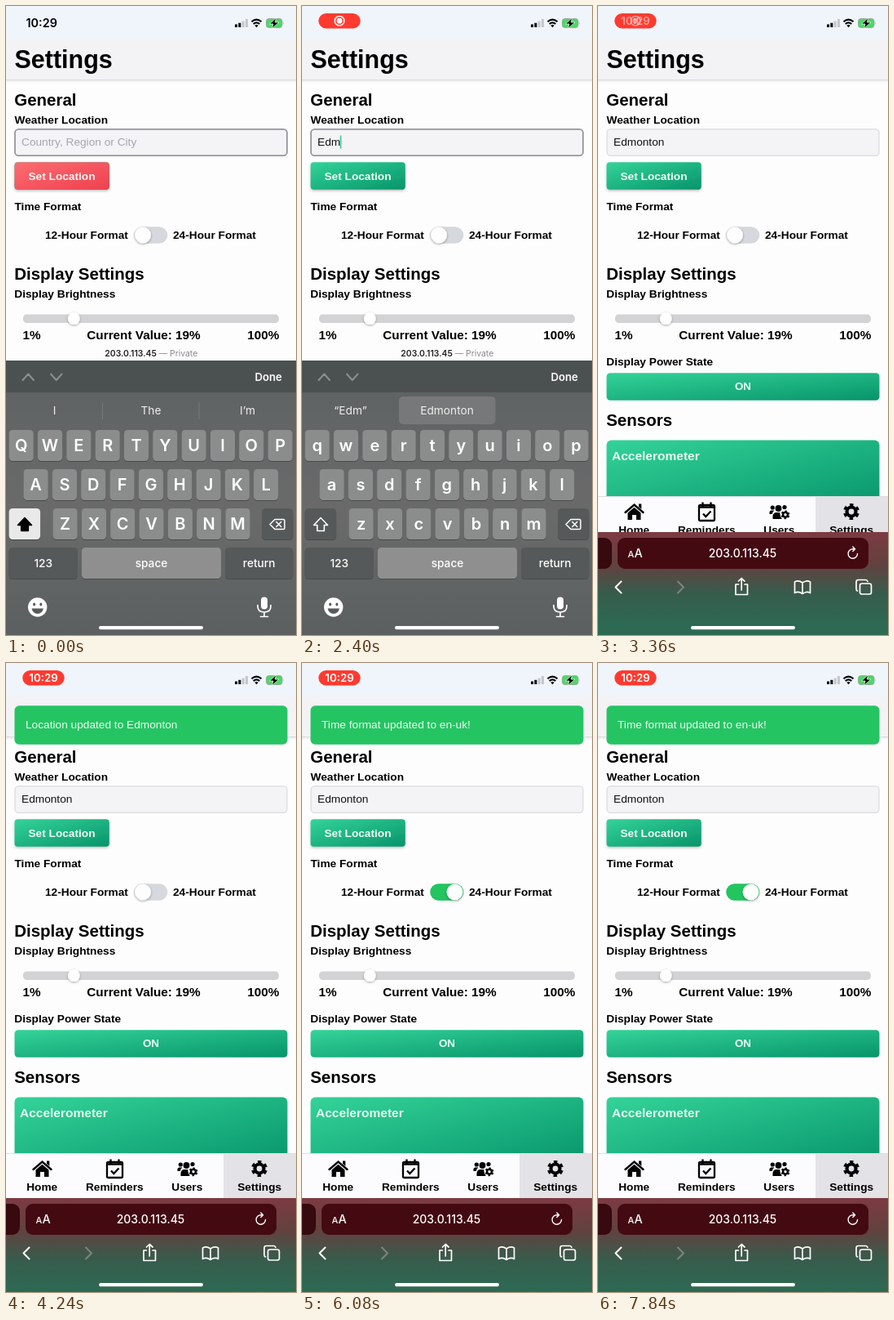
An HTML page that plays this animation: 356x770 px, repeating every 8 s.

```html
<!DOCTYPE html>
<html lang="en">
<head>
<meta charset="utf-8">
<title>Settings</title>
<style>
  html, body { margin: 0; width: 100%; height: 100%; overflow: hidden; background: #fff; }
  svg { display: block; width: 356px; height: 770px; }
  text { font: 13.7px "Liberation Sans", Arial, sans-serif; white-space: pre; }
  .b { font-weight: 700; }
  .h { font-weight: 700; font-size: 20.5px; }
  .v { font-weight: 700; font-size: 15.3px; }
  .ui { font-family: Inter, Roboto, sans-serif; font-size: 13.7px; }
  .key { font-size: 20px; font-weight: 600; }
  .cmd { font-weight: 500; }
  .mid { text-anchor: middle; }
  .line { fill: none; stroke: #fff; stroke-width: 1.7; stroke-linecap: round; stroke-linejoin: round; }
</style>
</head>
<body>
<svg viewBox="0 0 356 770">
  <defs>
    <linearGradient id="green" x2="1" y2="1"><stop stop-color="#34d399"/><stop offset="1" stop-color="#07946a"/></linearGradient>
    <linearGradient id="red" x2="1" y2="1"><stop stop-color="#fd6c72"/><stop offset="1" stop-color="#ee414e"/></linearGradient>
    <linearGradient id="keys" x2="0" y2="1"><stop stop-color="#5d6162"/><stop offset=".55" stop-color="#6a6a6a"/><stop offset="1" stop-color="#5a5f5f"/></linearGradient>
    <linearGradient id="bar" x2="0" y2="1"><stop stop-color="#7d3a42"/><stop offset=".35" stop-color="#61423f"/><stop offset=".65" stop-color="#375c4c"/><stop offset="1" stop-color="#2c6a54"/></linearGradient>
    <filter id="shade" x="-30%" y="-30%" width="160%" height="180%"><feDropShadow dx="0" dy="1.5" stdDeviation="1.6" flood-opacity=".25"/></filter>
    <filter id="lift" x="-60%" y="-60%" width="220%" height="220%"><feDropShadow dx="0" dy="1" stdDeviation="1.8" flood-opacity=".35"/></filter>
  </defs>

  <!-- page -->
  <rect width="356" height="770" fill="#fdfdfe"/>
  <rect width="356" height="41" fill="#f0f5fc"/>
  <rect y="41" width="356" height="49" fill="#f3f2f5"/>
  <rect y="90" width="356" height="1.5" fill="#dcdbe0"/>
  <rect y="91.5" width="356" height="2" fill="#f3f3f5"/>
  <text class="b" x="10.5" y="76" style="font-size:30.5px">Settings</text>
  <text class="h" x="10.2" y="122">General</text>
  <text class="b" x="10.5" y="144">Weather Location</text>
  <rect id="field" x="11" y="150.8" width="334" height="32.4" rx="4.5" fill="#f4f3f6"/>
  <text id="hint" x="19" y="171" fill="#a6a6ac">Country, Region or City</text>
  <text id="typed" x="19" y="171" fill="#111"></text>
  <rect id="caret" y="158.5" width="1.6" height="16" fill="#34c793"/>
  <g filter="url(#shade)">
    <rect x="10.5" y="191.2" width="116.3" height="33.6" rx="4" fill="url(#green)"/>
    <rect id="redBtn" x="10.5" y="191.2" width="116.3" height="33.6" rx="4" fill="url(#red)"/>
  </g>
  <text class="b mid" x="68.5" y="212.5" fill="#f2fbf7">Set Location</text>
  <text class="b" x="10.5" y="250">Time Format</text>
  <text class="b" x="48" y="285">12-Hour Format</text>
  <text class="b" x="205" y="285">24-Hour Format</text>
  <rect x="157.3" y="270.2" width="41" height="20.6" rx="10.3" fill="#d5d8dc"/>
  <rect id="on" x="157.3" y="270.2" width="41" height="20.6" rx="10.3" fill="#22c55e"/>
  <circle id="knob" cy="280.5" r="10" fill="#fdfdfd" filter="url(#lift)"/>
  <text class="h" x="10.2" y="335">Display Settings</text>
  <text class="b" x="10.3" y="357">Display Brightness</text>
  <rect x="21" y="377.5" width="314" height="10.5" rx="4.5" fill="#d3d3d5"/>
  <circle cx="83.3" cy="382.7" r="7.4" fill="#fff" filter="url(#lift)"/>
  <text class="v" x="20.5" y="408">1%</text>
  <text class="v mid" x="169" y="408">Current Value: 19%</text>
  <text class="v" x="335.3" y="408" text-anchor="end">100%</text>
  <text class="b" x="10.3" y="439.5">Display Power State</text>
  <rect x="10.5" y="449.3" width="335" height="33.4" rx="4.5" fill="url(#green)"/>
  <text class="b mid" x="178" y="470" fill="#e9fbf3" style="font-size:13.4px">ON</text>
  <text class="h" x="10.2" y="514">Sensors</text>
  <rect x="10.5" y="531.4" width="335" height="84" rx="6" fill="url(#green)"/>
  <text class="v" x="17" y="556" fill="#e6fbf2" style="font-size:15.5px">Accelerometer</text>

  <!-- tabs -->
  <rect y="600" width="356" height="60" fill="#fcfbfd"/>
  <rect x="267" y="600" width="89" height="60" fill="#e3e2e6"/>
  <rect y="600" width="356" height="1" fill="#dedde1"/>
  <path d="M33.5 620 44.5 610.5 55.5 620" fill="none" stroke="#000" stroke-width="2.4" stroke-linecap="round"/>
  <path d="M36.5 620.5 44.5 613.8 52.5 620.5V629H47V623H42V629H36.5ZM50 609.5H53.3V616L50 613Z"/>
  <g fill="none" stroke="#000" stroke-width="2.3">
    <rect x="124" y="611" width="19" height="19" rx="1.6"/>
    <path d="M124 613.5H143M128.500 607.5V613M138.5 607.5V613M129 621.5 132.3 625 138.5 618.5"/>
  </g>
  <circle cx="214.3" cy="614" r="2.6"/><circle cx="221.5" cy="615" r="3.9"/><circle cx="229" cy="613.5" r="2.6"/>
  <path d="M210.5 622V620Q210.5 617.5 213 617.5H216.5Q214 619 213.800 622ZM214.5 628V624.500Q215 620 219 620H223Q223.500 624 226 628Z"/>
  <circle cx="230" cy="622.800" r="6.300" fill="#fcfbfd"/>
  <g fill="none" stroke="#000">
    <circle cx="230" cy="622.8" r="2.9" stroke-width="2.4"/>
    <circle cx="230" cy="622.8" r="4.6" stroke-width="1.6" stroke-dasharray="2.41" stroke-dashoffset="3.6"/>
    <circle cx="311" cy="619" r="5.500" stroke-width="4.2"/>
    <circle cx="311" cy="619" r="8.5" stroke-width="3" stroke-dasharray="4.45" stroke-dashoffset="6.65"/>
  </g>
  <g class="mid">
    <text class="b" x="44.2" y="646">Home</text><text class="b" x="133.3" y="646">Reminders</text>
    <text class="b" x="222.3" y="646">Users</text><text class="b" x="311.2" y="646">Settings</text>
  </g>

  <!-- browser bar -->
  <g id="chrome">
    <g id="barBody">
      <rect y="655" width="356" height="116" fill="url(#bar)"/>
      <rect y="770" width="356" height="240" fill="#2c6a54"/>
      <rect x="-20" y="662" width="37" height="38" rx="9" fill="#360a0e"/>
      <rect x="24" y="662" width="308" height="38" rx="9" fill="#430a11"/>
      <text class="ui cmd" x="36.5" y="686" fill="#fff" style="font-size:11px">A</text>
      <text class="ui cmd" x="44.5" y="686" fill="#fff" style="font-size:14.5px">A</text>
      <text class="ui cmd mid" x="177.5" y="686" fill="#fff" style="font-size:14px">203.0.113.45</text>
      <g class="line">
        <path d="M318.5 681.5A5.7 5.7 0 1 1 313 675.8H315M312.8 673 315.6 675.8 312.8 678.6" stroke-width="1.4"/>
        <path d="M28.5 715.5 21.5 722.5 28.5 729.5" stroke-width="2"/>
        <path d="M98 715.5 105 722.5 98 729.5" stroke="#7d8580" stroke-width="2"/>
        <path d="M172.5 719H169V731.5H183.5V719H180M176.2 726V711.5M172.5 715 176.2 711.5 180 715"/>
        <path d="M251 717Q246 713.5 241.5 716V729.5Q246 727 251 730.5Q256 727 260.5 729.5V716Q256 713.5 251 717V730"/>
        <rect x="321.5" y="718" width="14" height="13" rx="2.5"/>
        <path d="M318.5 727Q317 726.5 317 724.5V716Q317 713.5 319.5 713.5H328.5Q330.5 713.5 331 715.5"/>
      </g>
    </g>
    <g id="compact">
      <rect y="654" width="356" height="21" fill="#fdfdfe"/>
      <text class="ui mid" x="178.3" y="669" fill="#8a8a8e" style="font-size:10.4px"><tspan fill="#222" font-weight="600">203.0.113.45</tspan> — Private</text>
    </g>
  </g>

  <!-- keyboard -->
  <g id="board">
    <rect y="434" width="356" height="340" fill="url(#keys)"/>
    <rect y="434" width="356" height="39" fill="#4b5050"/>
    <path class="line" d="M20.5 458 27.3 450.5 34 458M55 450.5 61.8 458 68.5 450.5" style="stroke:#8a8e8e;stroke-width:2"/>
    <text class="ui" x="305.5" y="459" fill="#fff" style="font-size:13.2px;font-weight:600">Done</text>
    <path id="split" d="M118.5 485V506M237 485V506" stroke="#767a7a"/>
    <rect id="pick" x="119" y="478" width="118.5" height="34" rx="5" fill="#777879"/>
    <g class="mid" fill="#eee">
      <text class="ui sug" x="59.5" y="500"></text>
      <text class="ui sug" x="178" y="500"></text>
      <text class="ui sug" x="296.5" y="500"></text>
    </g>
    <g id="caps"></g>
    <path id="shift" d="M23 626.5 31.5 635.5H27.3V642.5H18.7V635.5H14.5Z" stroke-width="1.6" stroke-linejoin="round"/>
    <path class="line" d="M324 634.5 330 628.5H340.5Q342 628.5 342 630V639Q342 640.5 340.5 640.5H330ZM331.8 631.5 337.8 637.5M337.8 631.5 331.8 637.5" style="stroke-width:1.5"/>
    <circle cx="38.7" cy="736" r="11.7" fill="#fff"/>
    <g fill="#565a5a"><ellipse cx="34.6" cy="732.5" rx="1.5" ry="2.1"/><ellipse cx="42.8" cy="732.5" rx="1.5" ry="2.1"/><path d="M31.5 737.5H46Q44.5 744 38.7 744Q33 744 31.5 737.5Z"/></g>
    <rect x="313" y="723.5" width="8" height="15" rx="4" fill="#fff"/>
    <path class="line" d="M309 733.5V735Q309 742 317 742Q325 742 325 735V733.5M317 742V747.5M312.5 747.5H321.5"/>
  </g>
  <rect x="114" y="759" width="128" height="4.2" rx="2.1" fill="#fff"/>

  <!-- toast -->
  <g id="toast">
    <rect x="10.5" y="52.3" width="335" height="47.4" rx="5.5" fill="#25c463"/>
    <text id="note1" x="24" y="80" fill="#eafaef">Location updated to Edmonton</text>
    <text id="note2" x="24" y="80" fill="#eafaef">Time format updated to en-uk!</text>
  </g>

  <!-- status -->
  <text id="clock" class="ui" x="24.5" y="26" style="font-size:14.4px;font-weight:600">10:29</text>
  <g id="pill">
    <rect id="pillBg" x="20.3" y="9" width="51.4" height="18.4" rx="9.2"/>
    <g id="rec"><circle cx="46" cy="18.2" r="5.8" fill="none" stroke="#fff" stroke-width="1.5"/><circle cx="46" cy="18.2" r="3.4" fill="#fff"/></g>
    <text id="pillTime" class="ui mid" x="46" y="23" fill="#fff" style="font-size:13.3px;font-weight:600">10:29</text>
  </g>
  <path d="M281 22.5H284V26H281ZM285.3 20.7H288.3V26H285.3Z"/>
  <path d="M289.6 18.5H292.6V26H289.6ZM293.9 16H296.9V26H293.9Z" fill="#c3c6cb"/>
  <path d="M301.5 19.2Q307.5 14 313.5 19.2M303.7 22Q307.5 18.7 311.3 22" fill="none" stroke="#000" stroke-width="2.1"/>
  <path d="M305.3 23.8Q307.5 22 309.7 23.8L307.5 26.3Z"/>
  <rect x="319.5" y="15.5" width="19.5" height="11" rx="3.2" fill="#4bd964" stroke="#9fa6a4"/>
  <path d="M340.5 19.2Q342 21 340.5 22.8Z" fill="#9fa6a4"/>
  <path d="M331.5 14.5 323.5 22H328L326.5 27.5 335 20H330.300Z" stroke="#e6f9e9" stroke-width=".8"/>
</svg>
<script>
const LOOP = 8000, FOCUS_END = 2950;
const $ = id => document.getElementById(id);
const NS = "http://www.w3.org/2000/svg";
const set = (node, attrs) => { for (const k in attrs) node.setAttribute(k, attrs[k]); return node; };
const add = (parent, tag, attrs) => parent.appendChild(set(document.createElementNS(NS, tag), attrs));
const ramp = (t, a, b) => Math.min(1, Math.max(0, (t - a) / (b - a)));
const easeOut = u => 1 - (1 - u) ** 3;
const smooth = u => u * u * (3 - 2 * u);
const fade = (id, v) => $(id).setAttribute("opacity", v);
const move = (id, y) => $(id).setAttribute("transform", `translate(0 ${y})`);
const pick = (steps, t) => steps.filter(s => s[0] <= t).pop();

const dim = (s, o) => `<tspan fill-opacity="${o}">${s}</tspan>`;
const typing = [[0, ""], [940, "E"], [1600, "Ed"], [2160, "Edm"], [2720, "Edmonton"]];
const hints = [
  [0, "I", "The", "I’m"],
  [960, "“" + dim("E", .5), "E" + dim("h", .7) + "en", "Ev" + dim("e", .6)],
  [1120, "“E”", "Even", "Every"],
  [1640, "“Ed”", "Edit", "Edge"],
  [2200, "“Edm”", "Edmonton", ""],
  [2720, "", "", ""]
];

// Keycaps
const caps = $("caps");
function cap(x, y, w, fill) {
  add(caps, "rect", { x, y: y + 1, width: w, height: 38, rx: 4.5, fill: "#484b4b" });
  return add(caps, "rect", { x, y, width: w, height: 38, rx: 4.5, fill });
}
function label(x, y, str, cls) {
  const node = add(caps, "text", { x, y, class: "ui mid " + cls, fill: "#fff" });
  node.textContent = str;
  return node;
}
const letters = [];
[["QWERTYUIOP", 3.6, 519], ["ASDFGHJKL", 21.5, 567], ["ZXCVBNM", 57.5, 615]].forEach(([row, x0, y]) => {
  [...row].forEach((ch, i) => {
    const x = x0 + i * 35.32;
    cap(x, y, 30.2, "#8b8d8d");
    letters.push([label(x + 15.1, y + 26, ch, "key"), ch]);
  });
});
const shiftCap = cap(3.6, 615, 38.5, "#565959");
cap(314, 615, 38.3, "#565959");
cap(3.6, 663, 84.4, "#565959");
cap(93, 663, 171, "#8f8f90");
cap(269, 663, 83.3, "#565959");
[[45.8, "123"], [178.5, "space"], [310.7, "return"]].forEach(([x, s]) => label(x, 686.5, s, "cmd"));

const sug = document.querySelectorAll(".sug");
let shown = null;

function drawKeyboard(t) {
  const upper = t < 960;
  const hint = pick(hints, t);
  if (hint !== shown) {
    shown = hint;
    sug.forEach((node, i) => node.innerHTML = hint[i + 1]);
  }
  const chosen = hint[2] === "Edmonton";
  fade("pick", +chosen);
  fade("split", chosen ? 0 : 1);
  letters.forEach(([node, ch]) => {
    const s = upper ? ch : ch.toLowerCase();
    if (node.textContent !== s) node.textContent = s;
  });
  set(shiftCap, { fill: upper ? "#e9e9e9" : "#565959" });
  set($("shift"), upper ? { fill: "#000", stroke: "#000" } : { fill: "none", stroke: "#fff" });
}

function drawField(t) {
  const str = pick(typing, t)[1], focus = t < FOCUS_END;
  $("typed").textContent = str;
  fade("hint", str ? 0 : 1);
  set($("field"), { stroke: focus ? "#98979c" : "#e1e0e6", "stroke-width": focus ? 1.8 : 1.5 });
  set($("caret"), { x: 18.6 + (str ? $("typed").getComputedTextLength() : 0) });
  fade("caret", focus && t > 300 ? 1 : 0);
  fade("redBtn", 1 - ramp(t, 930, 1020));
}

function drawStatus(t) {
  const red = ramp(t, 400, 650), time = ramp(t, 3180, 3540);
  const pulse = t > 3600 ? 1 : .5 - .5 * Math.cos((t - 1040) / 907 * 2 * Math.PI);
  const mix = (a, b) => Math.round(a + (b - a) * pulse);
  fade("clock", 1 - red);
  fade("pill", red);
  fade("rec", 1 - time);
  fade("pillTime", time);
  set($("pillBg"), { fill: `rgb(${mix(217, 255)},${mix(47, 59)},${mix(43, 48)})` });
}

function draw(t) {
  drawStatus(t);
  drawField(t);
  drawKeyboard(t);

  const drop = easeOut(ramp(t, FOCUS_END, 3590));
  move("board", 410 * drop);
  move("chrome", -240 * (1 - drop));
  fade("barBody", ramp(drop, .1, .6));
  fade("compact", 1 - ramp(drop, 0, .35));

  const show = easeOut(ramp(t, 3960, 4160));
  move("toast", -50 * (1 - show));
  fade("toast", show);
  const swap = ramp(t, 5840, 5960);
  fade("note1", 1 - swap);
  fade("note2", swap);

  const flip = smooth(ramp(t, 5600, 6100));
  set($("knob"), { cx: 168 + 19.6 * flip });
  fade("on", flip);
}

const start = performance.now();
function tick() {
  draw((performance.now() - start) % LOOP);
  requestAnimationFrame(tick);
}
tick();
</script>
</body>
</html>
```
